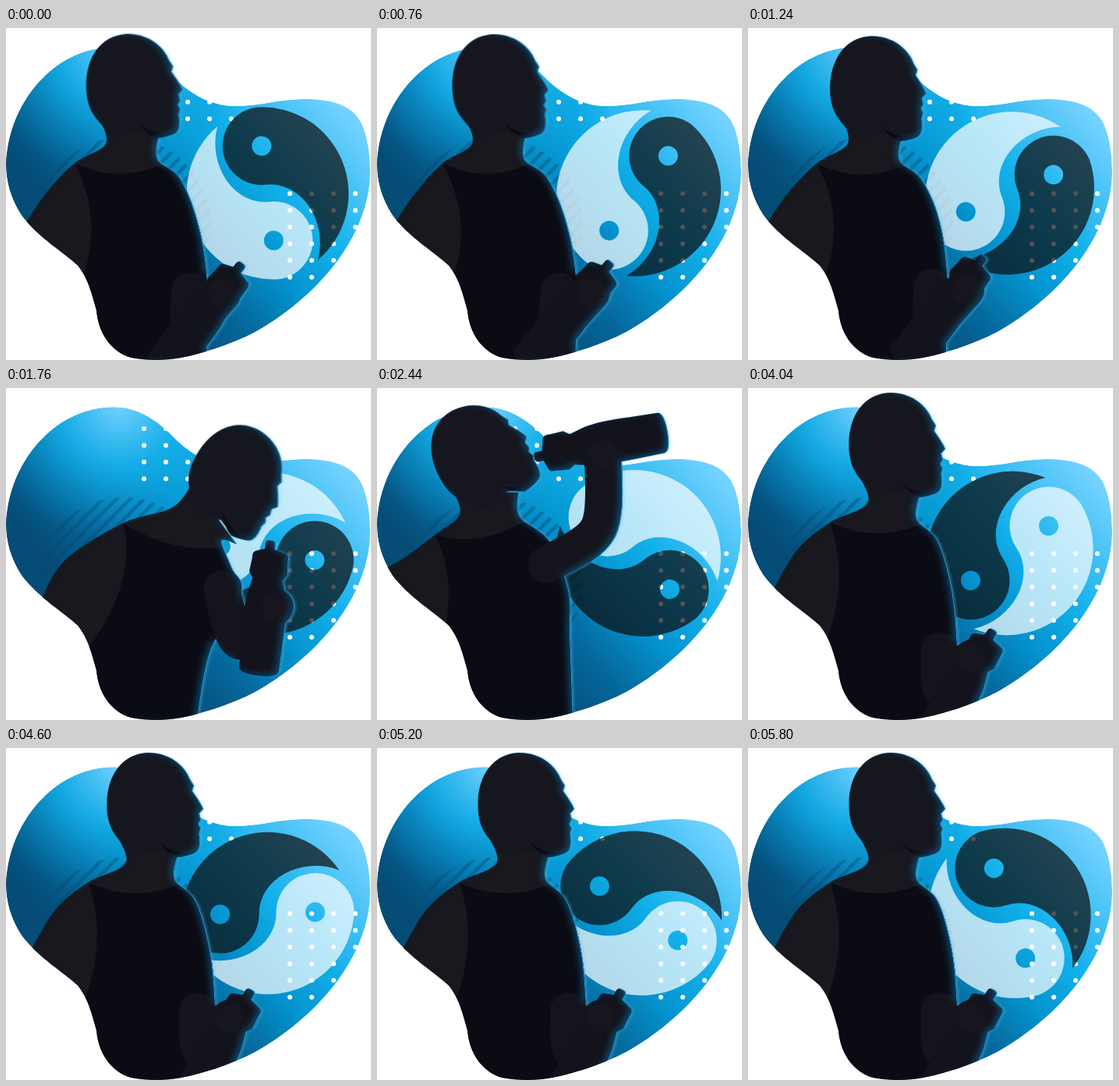
These frames come from a looping animation (468 by 425 pixels, 5.84 s). An HTML page:

```html
<!DOCTYPE html>
<html lang="en">
<head>
<meta charset="utf-8">
<title>Balance</title>
<style>
  html, body { margin: 0; width: 100%; height: 100%; overflow: hidden; background: #fff; }
  svg { display: block; width: 468px; height: 425px; }
</style>
</head>
<body>
<svg viewBox="0 0 468 425">
  <defs>
    <path id="blob" d="M0 175C2 98 60 25 138 24.5C170 24.5 195 43 213 61C233 82 260 100 295 100C325 100 350 91 382 91C418 91 440 98 453 117C463 133 467 160 467 185C466 270 395 347 320 389C285 407 250 417 225 422C205 426 180 426 160 422C135 415 118 390 116 362C110 340 105 320 92 304C75 288 40 267 20 240C5 217 0 195 0 175Z"/>
    <clipPath id="inBlob"><use href="#blob"/></clipPath>
    <clipPath id="inFigure"><use href="#blob"/><rect width="468" height="200"/></clipPath>
    <clipPath id="inBody"><path id="bodyClip"/></clipPath>
    <linearGradient id="sky" gradientUnits="userSpaceOnUse" x1="420" y1="90" x2="150" y2="330">
      <stop offset="0" stop-color="#74d2ff"/>
      <stop offset=".35" stop-color="#12b0ea"/>
      <stop offset=".55" stop-color="#0494cf"/>
      <stop offset=".77" stop-color="#05689c"/>
      <stop offset="1" stop-color="#054c76"/>
    </linearGradient>
    <radialGradient id="shine" gradientUnits="userSpaceOnUse" cx="145" cy="22" r="175">
      <stop offset="0" stop-color="#74d2ff"/>
      <stop offset=".45" stop-color="#18b0ea" stop-opacity=".85"/>
      <stop offset="1" stop-color="#0494cf" stop-opacity="0"/>
    </radialGradient>
    <pattern id="stripes" width="12.4" height="12" patternUnits="userSpaceOnUse" patternTransform="rotate(45)">
      <rect width="4.6" height="12" fill="#04466e" fill-opacity=".4"/>
    </pattern>
    <path id="half" fill-rule="evenodd" d="M0-111A111 111 0 0 1 53 93A60 72 0 0 0 0-11A50 50 0 0 1 0-111ZM-12.5-61a12.5 12.5 0 1 0 25 0a12.5 12.5 0 1 0-25 0Z"/>
    <!-- Cyan light falling on the front of the figure -->
    <filter id="rim" filterUnits="userSpaceOnUse" x="-10" y="-10" width="490" height="460" color-interpolation-filters="sRGB">
      <feOffset in="SourceAlpha" dx="-5" dy="-2"/>
      <feGaussianBlur stdDeviation="4"/>
      <feComposite in="SourceAlpha" operator="out" result="wide"/>
      <feFlood flood-color="#07608f" flood-opacity=".7"/>
      <feComposite in2="wide" operator="in" result="inner"/>
      <feOffset in="SourceAlpha" dx="-1.2"/>
      <feGaussianBlur stdDeviation=".7"/>
      <feComposite in="SourceAlpha" operator="out" result="thin"/>
      <feFlood flood-color="#3fb4ea" flood-opacity=".75"/>
      <feComposite in2="thin" operator="in" result="edge"/>
      <feDropShadow in="SourceGraphic" dx="2" dy="0" stdDeviation="1.6" flood-color="#4cc4fa" flood-opacity=".35"/>
      <feMerge>
        <feMergeNode/>
        <feMergeNode in="inner"/>
        <feMergeNode in="edge"/>
      </feMerge>
    </filter>
  </defs>

  <g clip-path="url(#inBlob)">
    <use href="#blob" fill="url(#sky)"/>
    <use href="#blob" fill="url(#shine)"/>
    <circle cx="151" cy="252" r="112" fill="url(#stripes)"/>
    <g id="dots" fill="#fff"></g>
    <g id="symbol">
      <use href="#half" fill="#0e0a0a" fill-opacity=".7"/>
      <use href="#half" fill="#fff" fill-opacity=".7" transform="rotate(180)"/>
    </g>
  </g>

  <g clip-path="url(#inFigure)">
    <g filter="url(#rim)">
      <path id="body" fill="#18181e"/>
      <path id="tank" fill="#0b0b13" clip-path="url(#inBody)"/>
      <g id="head">
        <path fill="#16161f" d="M131 90C124 50 140 8 182 6C215 6 232 28 236 40L241 48L239 55C244 62 251 72 253 78L248 84L250 92L247 97L250 103L248 110C250 118 250 131 243 134C232 139 212 136 200 130L165 138C143 118 134 106 131 90Z"/>
        <path fill="#0b0b13" d="M197 121Q214 136 243 134Q232 139 221 140Q204 134 197 121Z"/>
      </g>
      <path id="arm" fill="none" stroke="#15141c" stroke-width="48" stroke-linecap="round" stroke-linejoin="round"/>
      <path id="bottle" fill="#13131c" d="M-9-84Q-8-89-3-88Q4-89 4-84V-77L20-73Q24-70 23-64L24-46L19-38L24-20Q29 0 27 40L26 78Q24 86 0 86Q-24 86-26 78L-27 40Q-28 0-25-20L-21-38L-26-46L-24-64Q-25-71-20-73L-9-77Z"/>
      <circle id="hand" r="18" fill="#17161f"/>
    </g>
  </g>
</svg>
<script>
const LOOP = 5840, STEP = 40;
const el = id => document.getElementById(id);

// Each pose: back of body, front of body, armhole curve, arm, head and bottle (x, y, angle)
const ready = {
  back: [34,255, 64,206, 105,172, 153,148, 143,113],
  front: [221,136, 217,168, 243,195, 260,250, 268,318, 270,430],
  hole: [130,240, 102,320], arm: [246,337, 250,385, 287,346],
  head: [185,80,0], bottle: [273,387,30]
};
const lean = {
  back: [25,250, 53,209, 88,173, 128,148, 118,113],
  front: [197,135, 195,168, 223,192, 245,245, 258,318, 258,430],
  hole: [125,245, 98,320], arm: [236,337, 238,380, 278,340],
  head: [158.5,81.6,-.5], bottle: [251,372,38]
};
const bow = {
  back: [46,268, 77,219, 150,173, 213,153, 239,122],
  front: [296,200, 277,196, 290,231, 302,262, 262,338, 245,430],
  hole: [170,250, 100,340], arm: [277,258, 300,324, 346,280],
  head: [289,119,31], bottle: [333,283,6]
};
const drink = {
  back: [3,235, 38,215, 74,188, 106,162, 97,130],
  front: [182,134, 184,165, 222,197, 246,260, 248,320, 252,430],
  hole: [100,240, 88,305], arm: [218,226, 284,180, 290,85],
  head: [132,94,-26], bottle: [288,71,-100]
};
const lower = {
  back: [27,252, 57,213, 95,177, 122,150, 103,114],
  front: [195,130, 193,160, 222,195, 246,255, 248,320, 252,430],
  hole: [112,235, 90,305], arm: [226,228, 262,280, 308,286],
  head: [144,82.7,-9], bottle: [299,285,0]
};

const mix = (a, b, k) => Object.fromEntries(Object.keys(a).map(part =>
  [part, a[part].map((v, i) => v + (b[part][i] - v) * k)]));
const sway = mix(ready, lean, 1.24);

const keys = [
  [0, lean], [600, sway], [1150, sway], [1740, bow], [1860, bow], [2420, drink],
  [2900, drink], [3120, lower], [3560, ready], [LOOP, ready]
];

function poseAt(t) {
  const i = keys.findIndex(k => k[0] > t);
  const [t0, a] = keys[i - 1], [t1, b] = keys[i];
  const k = (t - t0) / (t1 - t0);
  return mix(a, b, k * k * (3 - 2 * k));
}

// Smooth curve through a flat list of points, without the opening move
function curve(list) {
  const n = list.length / 2;
  const p = i => { i = Math.max(0, Math.min(n - 1, i)); return [list[2 * i], list[2 * i + 1]]; };
  const near = (a, b, c) => [0, 1].map(j => a[j] + (c[j] - b[j]) / 6);
  let d = p(0).join();
  for (let i = 0; i < n - 1; i++)
    d += `C${near(p(i), p(i - 1), p(i + 1))} ${near(p(i + 1), p(i + 2), p(i))} ${p(i + 1)}`;
  return d;
}

function addDots(x0, y0, cols, rows) {
  let s = "";
  for (let i = 0; i < cols; i++)
    for (let j = 0; j < rows; j++)
      s += `<circle cx="${x0 + 28 * i}" cy="${y0 + 21.4 * j}" r="3"/>`;
  el("dots").innerHTML += s;
}
addDots(177, 52, 5, 4);
addDots(364, 212, 4, 6);

const place = (id, [x, y, a], pivot = "") =>
  el(id).setAttribute("transform", `translate(${x} ${y}) rotate(${a}) ${pivot}`);

function draw(t) {
  const { back, front, hole, arm, head, bottle } = poseAt(t);
  place("symbol", [335.5, 211.5, -7.3 + t * .06]);

  const body = `M${curve(back)}L${curve(front)}L0,440Z`;
  el("body").setAttribute("d", body);
  el("bodyClip").setAttribute("d", body);

  const [tx, ty] = back.slice(4), [fx, fy] = front.slice(2);
  el("tank").setAttribute("d",
    `M${tx},${ty}Q${(tx + fx) / 2},${(ty + fy) / 2 + 28} ${fx},${fy + 8}` +
    `L400,${fy}V440H100L${hole.slice(2)}Q${hole.slice(0, 2)} ${tx},${ty}Z`);

  place("head", head, "translate(-185 -80)");
  el("arm").setAttribute("d", "M" + curve(arm));
  place("bottle", bottle);
  place("hand", [arm[4], arm[5], 0]);
}

function tick() {
  draw(Math.floor(performance.now() % LOOP / STEP) * STEP);
  requestAnimationFrame(tick);
}
tick();
</script>
</body>
</html>
```
